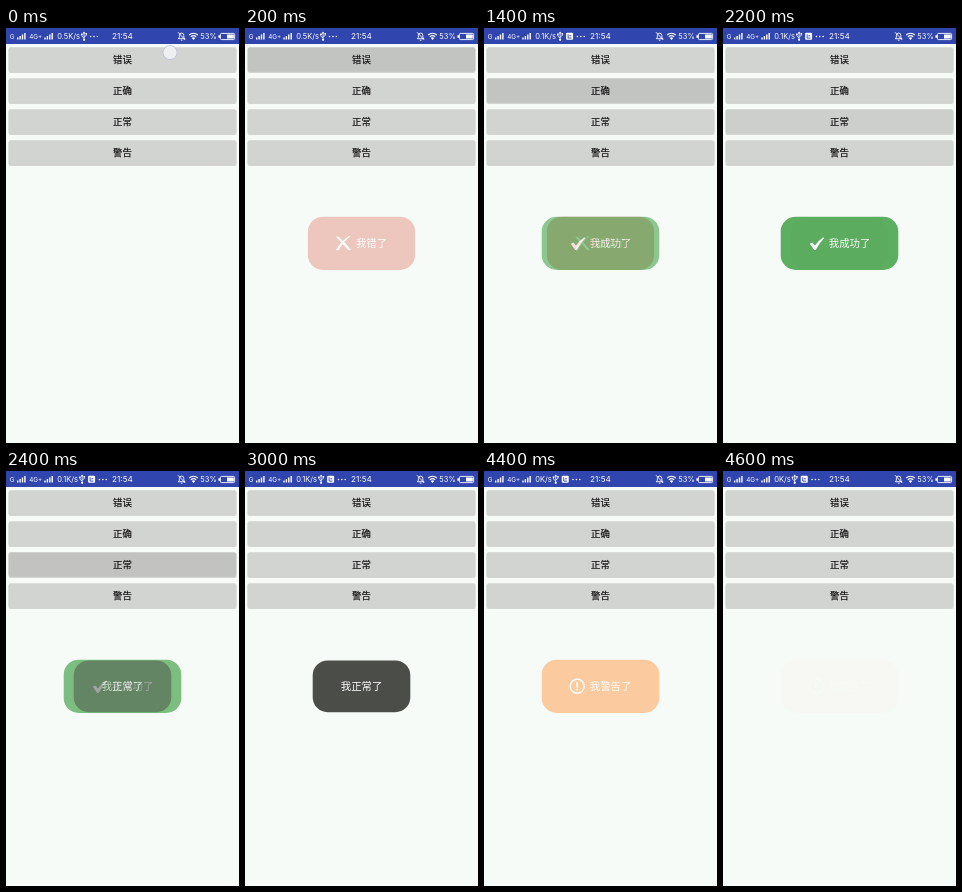
Recreate the animation shown at these times as an HTML page. Size 233x415 px, loop 4800 ms.

```html
<!DOCTYPE html>
<html lang="zh-CN">
<head>
<meta charset="utf-8">
<style>
html, body { margin: 0; width: 100%; height: 100%; overflow: hidden; background: #f7fbf8; }
svg { display: block; width: 100%; height: 100%; }
text { font-family: "Noto Sans CJK SC", "Noto Sans CJK", sans-serif; }
#status text { font: 7.5px Inter, sans-serif; fill: #fff; }
#status .small { font-size: 6.3px; }
#status .clock { font-size: 8.2px; }
.label { font-size: 9.4px; font-weight: 500; text-anchor: middle; fill: #111; stroke: #111; stroke-width: .2px; }
.toast text { font-size: 10.4px; fill: #fff; text-anchor: end; }
.line { fill: none; stroke: #fff; }
</style>
</head>
<body>
<svg viewBox="0 0 233 415">
  <rect width="233" height="415" fill="#f7fbf8"/>
  <g id="status">
    <rect width="233" height="16" fill="#3045ad"/>
    <text class="small" x="3.8" y="10.8">G</text>
    <text class="small" x="23.2" y="10.8">4G+</text>
    <path id="bars" class="line" stroke-width="1.4" d="M11.7 11.5v-2M14.1 11.5v-3.5M16.5 11.5v-5M18.9 11.5v-6.5"/>
    <use href="#bars" x="27.3"/>
    <text id="speed" x="51.2" y="11"></text>
    <g id="usb">
      <path class="line" stroke-width=".8" d="M3 4v8M.8 6.5v1.7L3 10M5.2 6v1.5L3 9"/>
      <path fill="#fff" d="M1.7 5.4L3 3.4l1.3 2zM0 5.4h1.6V7H0zM4.5 5H6v1.5H4.5z"/>
      <circle cx="3" cy="11.8" r="1.1" fill="#fff"/>
    </g>
    <g id="note">
      <rect y="4.8" width="7" height="7" rx="1" fill="#fff"/>
      <path stroke="#3045ad" stroke-width=".9" fill="none" d="M2 6.3v3.8h3.3M3.2 7.8h2"/>
    </g>
    <path id="dots" class="line" stroke-width="1.6" stroke-linecap="round" stroke-dasharray="0 3.4" d="M1 8.5h7"/>
    <text class="clock" x="106" y="11.2">21:54</text>
    <path class="line" stroke-width=".9" d="M172.3 10.7h6.6l-1.1-1.5V7.3a2.2 2.2 0 0 0-4.4 0v1.9zM174.8 12.2h1.7M172 4.2l7.2 7.8"/>
    <path class="line" stroke-width="1.1" d="M183.2 7a6 6 0 0 1 8.6 0M184.8 8.8a4 4 0 0 1 5.4 0"/>
    <path fill="#fff" d="M185.8 10a2.4 2.4 0 0 1 3.4 0l-1.7 2z"/>
    <text x="194.3" y="11">53%</text>
    <rect x="214.4" y="5.4" width="14.2" height="6.2" rx="1" class="line" stroke-width=".9"/>
    <path fill="#fff" d="M212.4 7.2h1.8v2.6h-1.8zM221 6.4h6.8v4.2H221z"/>
  </g>
  <g id="buttons"></g>
  <g id="toasts"></g>
  <circle id="touch" cx="164" cy="24.5" r="7" fill="#f3f4f6" fill-opacity=".85" stroke="#b9bfdc" stroke-width=".8"/>
</svg>
<script>
const STEP = 200, LOOP = 4800, FADE = 500, OVERLAP = 100;
const PAD = 28, ICON = 20, GLYPH = 10.4, CENTER_X = 116.5, CENTER_Y = 215.3;
const $ = id => document.getElementById(id);

const CROSS = `<path fill="#fff" d="M.3-6.4Q1.8-7.4 3.2-6Q9.5-.5 15 6.3Q13.6 7.8 12 6.4Q6.5 0 .3-6.4zM14.6-7Q7.2-1.5 3 6.6Q1.6 7.8 0 6.8Q5-1.8 13-7.2z"/>`;
const CHECK = `<path fill="#fff" d="M1.1.5l2.6-1.4 2.6 3.2q3.5-5.2 8.4-8.3l.8.8q-4.8 5-8.4 11.7l-1.6.1z"/>`;
const ALERT = `<circle cx="7.5" r="7" class="line" stroke-width="1.5"/>
  <path class="line" stroke-width="1.7" d="M7.5-4.4v5.5M7.5 2.5v1.8"/>`;

const items = [
  { label: "错误", text: "我错了", fill: "#dd6452", icon: CROSS, start: 0 },
  { label: "正确", text: "我成功了", fill: "#5caf60", icon: CHECK, start: 1090 },
  { label: "正常", text: "我正常了", fill: "#4b4d49", icon: "", start: 2150 },
  { label: "警告", text: "我警告了", fill: "#ff9c49", icon: ALERT, start: 3215 }
];
const LAST_END = 4050;

$("buttons").innerHTML = items.map(({ label }, i) => `
  <g transform="translate(0 ${31 * i})">
    <rect x="2.5" y="20" width="228" height="25" rx="2" fill="#bfc2bf" opacity=".65"/>
    <rect x="2.7" y="19.2" width="227.6" height="24.6" rx="2" fill="#d2d4d1"/>
    <rect class="press" x="2.7" y="19.2" width="227.6" height="24.6" rx="2"/>
    <text class="label" x="${CENTER_X}" y="35">${label}</text>
  </g>`).join("");

$("toasts").innerHTML = items.map(({ text, fill, icon }) => {
  const w = 2 * PAD + text.length * GLYPH + (icon ? ICON : 0);
  const h = icon ? 53.2 : 51.8;
  return `<g class="toast" transform="translate(${CENTER_X} ${CENTER_Y})">
    <rect x="${-w / 2}" y="${-h / 2}" width="${w}" height="${h}" rx="15" fill="${fill}"/>
    <g transform="translate(${PAD - w / 2})">${icon}</g>
    <text x="${w / 2 - PAD}" y="3.7">${text}</text>
  </g>`;
}).join("");

const toasts = document.querySelectorAll(".toast");
const presses = document.querySelectorAll(".press");
const progress = age => Math.min(1, Math.max(0, age / FADE));
const ease = age => (1 - Math.cos(Math.PI * progress(age))) / 2;

function place(id, x) {
  $(id).setAttribute("transform", `translate(${x} 0)`);
}

function drawStatus(t) {
  const hasNote = t >= 1200;
  $("speed").textContent = t < 1200 ? "0.5K/s" : t < 3400 ? "0.1K/s" : "0K/s";
  const usb = 52.3 + $("speed").getComputedTextLength();
  place("usb", usb);
  place("note", usb + 9);
  $("note").style.opacity = +hasNote;
  place("dots", usb + (hasNote ? 19.3 : 8.5));
}

function draw(now) {
  const t = Math.floor(now % LOOP / STEP) * STEP;
  drawStatus(t);
  $("touch").style.opacity = t ? 0 : 1;
  items.forEach(({ start }, i) => {
    const end = (items[i + 1]?.start ?? LAST_END) + OVERLAP;
    toasts[i].style.opacity = ease(t - start) * (1 - ease(t - end));
    presses[i].style.opacity = .08 * Math.sin(Math.PI * progress(t - start));
  });
}

function tick() {
  draw(performance.now() - origin);
  requestAnimationFrame(tick);
}
const origin = performance.now();
tick();
</script>
</body>
</html>
```
